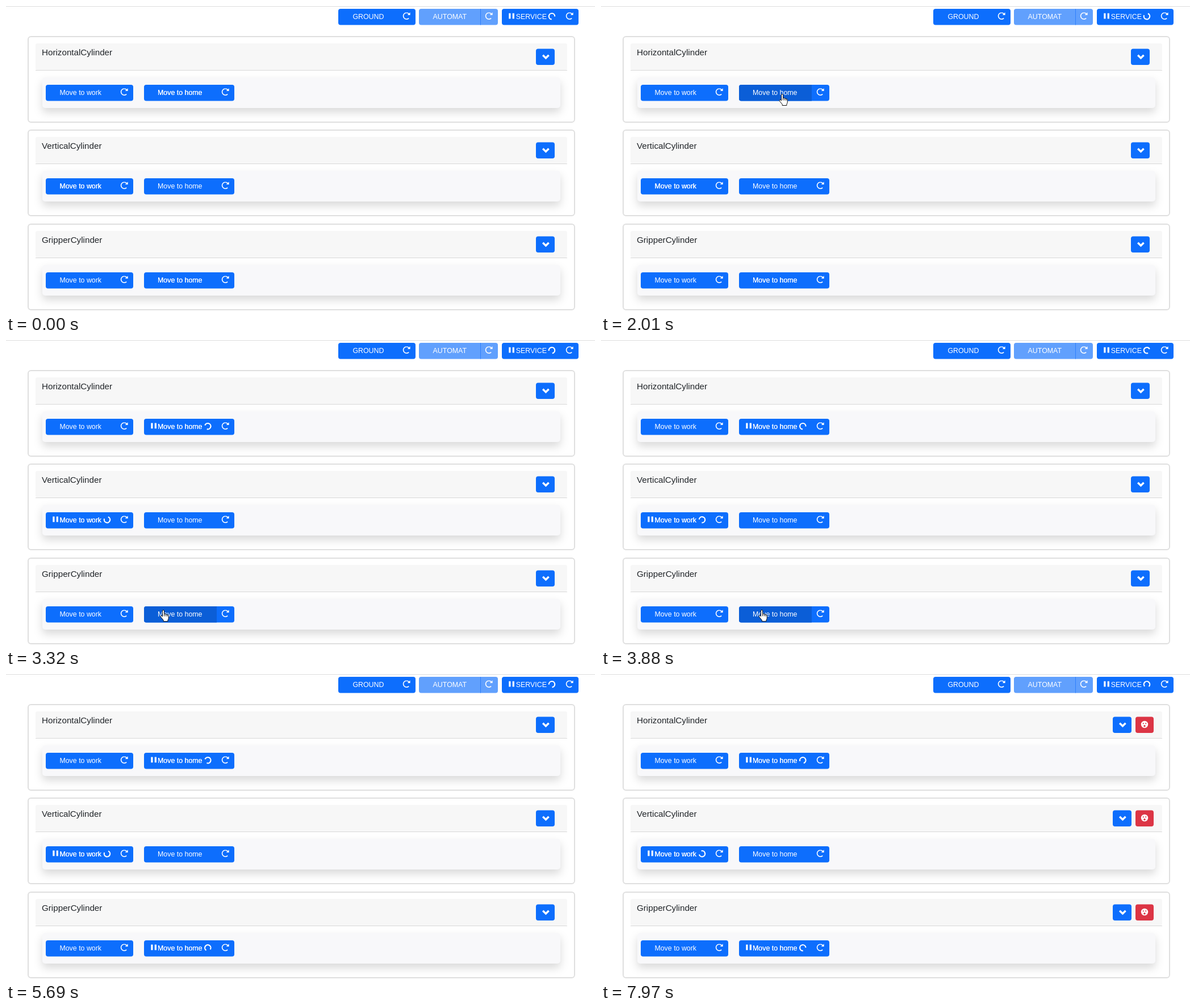
Write an HTML page that moves like this. It is 1037 px wide and 540 px high and loops after 8000 ms.

```html
<!DOCTYPE html>
<html lang="en">
<head>
<meta charset="utf-8">
<title>Cylinder control</title>
<style>
  html, body { margin: 0; width: 100%; height: 100%; overflow: hidden; background: #fff; }
  svg { display: block; font-family: "Liberation Sans", Arial, sans-serif; }
  .title { font-size: 15.2px; fill: #212529; }
  .label { font-size: 12.4px; fill: #fff; }
  .shadow { filter: blur(7.6px); fill: rgba(0, 0, 0, .15); }
</style>
</head>
<body>
<svg id="stage" width="1037" height="540" viewBox="0 0 1037 540"></svg>
<script>
const LOOP = 8000, SPIN = 787.5, FADE = 150;
const BLUE = '#0d6efd', DARK = '#0b5ed7', RED = '#dc3545';

const ICONS = {
  reload: 'M4 0c-2.2 0-4 1.8-4 4s1.8 4 4 4c1.1 0 2.12-.43 2.84-1.16l-.72-.72c-.54.54-1.29.88-2.13.88-1.66 0-3-1.34-3-3s1.34-3 3-3c.83 0 1.55.36 2.09.91l-1.09 1.09h3v-3l-1.19 1.19c-.72-.72-1.71-1.19-2.81-1.19z',
  pause: 'M0 0v6h2v-6zM4 0v6h2v-6z',
  chevron: 'M1.5 0l-1.5 1.5 4 4 4-4-1.5-1.5-2.5 2.5-2.5-2.5z'
};

// start: spinner appears, error: red button appears, hover: pointer over the button
const cards = [
  { name: 'HorizontalCylinder', y: 0, busy: 1, start: 2200, error: 5980, hover: [1430, 2190] },
  { name: 'VerticalCylinder', y: 165, busy: 0, start: 2785, error: 6560, hover: [2440, 2700] },
  { name: 'GripperCylinder', y: 331, busy: 1, start: 3945, error: 7710, hover: [3130, 3920] }
];

// pointer path: time, x, y
const path = [
  [730, 989, 540], [860, 984, 525], [1390, 327, 168], [1480, 319, 156],
  [2130, 319, 156], [2270, 277, 250], [2480, 166, 314], [2640, 166, 314],
  [2800, 166, 366], [3180, 277, 477], [3850, 277, 477], [4150, 480, 472],
  [4400, 513, 469], [5050, 513, 469], [5200, 540, 436], [5330, 620, 476], [5620, 815, 515]
];

const rect = (x, y, w, h, fill, r = 4, more = '') =>
  `<rect x="${x}" y="${y}" width="${w}" height="${h}" rx="${r}" fill="${fill}" ${more}/>`;
const text = (x, y, s, cls = 'label') => `<text x="${x}" y="${y}" class="${cls}">${s}</text>`;
const icon = (name, x, y) =>
  `<path d="${ICONS[name]}" fill="#fff" transform="translate(${x} ${y}) scale(1.6)"/>`;

const spinner = (id, x, y) =>
  `<g transform="translate(${x} ${y})"><path id="${id}" d="M3.68 3.68A5.2 5.2 0 1 1 3.68-3.68"
    fill="none" stroke="#fff" stroke-width="2.2"/></g>`;

const button = (x, y, w, label, textX) =>
  rect(x, y, w, 28.5, BLUE) + text(textX, y + 18, label) + icon('reload', x + w - 22.2, y + 6.2);

function card(c, i) {
  const { y } = c, [x, w, tx, sx] = c.busy ? [243, 128, 267, 355.3] : [70, 123, 94.4, 178];
  const by = y + 139;
  return rect(39, y + 54, 962, 151, '#fff', 5, 'stroke="#dfdfdf" stroke-width="2"')
    + rect(52, y + 66, 936, 47, '#f7f7f7', 3) + rect(52, y + 113, 936, 1, '#d8d8d8', 0)
    + text(63, y + 87, c.name, 'title')
    + `<rect class="shadow" x="64" y="${y + 133.6}" width="912" height="54" rx="5"/>`
    + rect(64, y + 126, 912, 54, '#f8f8fa', 5)
    + button(70, by, 154, 'Move to work', 94.4) + button(243, by, 159, 'Move to home', 267)
    + `<path id="hover${i}" d="M${x + w} ${by}v28.5h${4 - w}q-4 0-4-4v-20.5q0-4 4-4z" fill="${DARK}"/>`
    + text(tx, by + 18, c.busy ? 'Move to home' : 'Move to work')
    + `<g id="busy${i}">${icon('pause', x + 12.3, by + 7.6)}${spinner('spin' + i, sx, by + 13.2)}</g>`
    + `<g id="open${i}">${rect(933, y + 75.5, 33, 28.5, BLUE)}${icon('chevron', 944, y + 85.5)}</g>`
    + `<g id="error${i}">${rect(941, y + 75.5, 32, 28.5, RED)}
        <circle cx="957" cy="${y + 89}" r="6.2" fill="#fff"/>
        <g fill="${RED}"><circle cx="954.8" cy="${y + 87.3}" r="1.1"/>
        <circle cx="959.2" cy="${y + 87.3}" r="1.1"/><circle cx="957" cy="${y + 91.7}" r="1.7"/></g></g>`;
}

const stage = document.getElementById('stage');
stage.innerHTML = rect(0, 0, 1037, 1, '#dcdcdc', 0)
  + button(585, 5, 136, 'GROUND', 610.4)
  + `<g opacity=".65">${button(727, 5, 139, 'AUTOMAT', 751.6)}</g>`
  + rect(835, 5, 1, 28.5, '#2f81fd', 0)
  + button(873, 5, 135, 'SERVICE', 897.8) + icon('pause', 885.3, 12.8) + spinner('service', 961, 18.2)
  + cards.map(card).join('')
  + `<g id="pointer" fill="#fff" stroke="#111" stroke-linejoin="round">
      <path id="arrow" d="M.5 .5v15.3l3.5-3.2 2.3 5.3 2.3-1-2.3-5.1h4.8z"/>
      <path id="hand" d="M-1.5 10V1.2q0-1.7 1.5-1.7t1.5 1.7V6.5q2.4-.9 2.8.7 2.2-.6 2.6.8 2.3-.3 2.3 1.8v4.2q0 1.7-1.3 3.2v2.3H.2V17.500l-4.700-5.700q-.9-1.600.3-2.300 1.300-.4 2.700 1.500zM1.500 6.500v4M4.300 7.500v3M6.900 8.300v2.500"/>
    </g>`;

const el = id => document.getElementById(id);
const show = (id, on) => el(id).setAttribute('visibility', on ? 'visible' : 'hidden');
const turn = (id, deg) => el(id).setAttribute('transform', `rotate(${deg})`);
const clamp = v => Math.max(0, Math.min(1, v));

function movePointer(t) {
  const i = path.findIndex(k => k[0] > t);
  const hand = cards.some(({ hover: [a, b] }) => t >= a && t < b);
  show('arrow', i > 0 && !hand);
  show('hand', i > 0 && hand);
  if (i < 1) return;
  const [t0, x0, y0] = path[i - 1], [t1, x1, y1] = path[i];
  const u = (t - t0) / (t1 - t0), e = u * u * (3 - 2 * u);
  el('pointer').setAttribute('transform', `translate(${x0 + (x1 - x0) * e} ${y0 + (y1 - y0) * e})`);
}

function draw(t) {
  turn('service', 48 + t / SPIN * 360);
  cards.forEach((c, i) => {
    const [a, b] = c.hover;
    el('hover' + i).setAttribute('opacity', clamp((t - a) / FADE) - clamp((t - b) / FADE));
    show('busy' + i, t >= c.start);
    turn('spin' + i, (t - c.start) / SPIN * 360);
    show('error' + i, t >= c.error);
    el('open' + i).setAttribute('transform', `translate(${t >= c.error ? -32 : 0} 0)`);
  });
  movePointer(t);
}

const begin = performance.now();
function tick() {
  draw((performance.now() - begin) % LOOP);
  requestAnimationFrame(tick);
}
tick();
</script>
</body>
</html>
```
